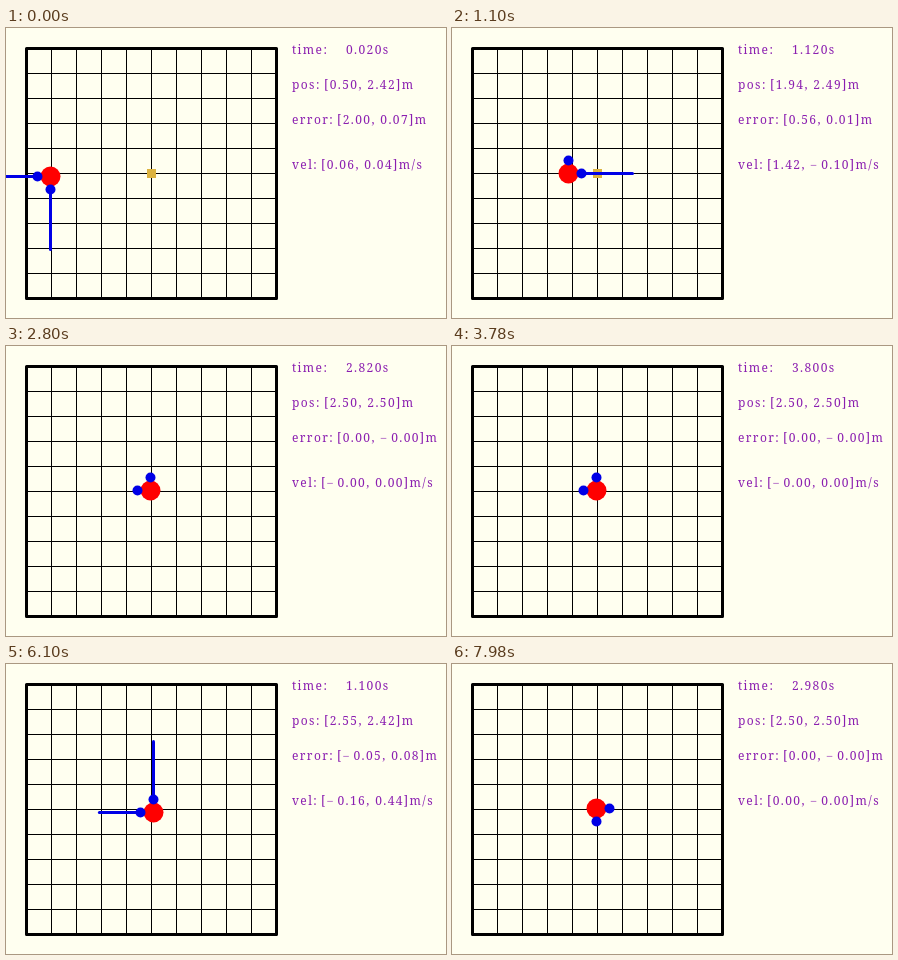
An HTML page with a canvas for the animation above (8 s loop, 440 px wide and 290 px high).

```html
<!DOCTYPE html>
<html lang="en">
<head>
<meta charset="utf-8">
<title>Thruster control</title>
<style>
  html, body { margin: 0; width: 100%; height: 100%; overflow: hidden; background: #fffff0; }
  canvas { display: block; }
</style>
</head>
<body>
<canvas id="stage" width="440" height="290"></canvas>
<script>
const ctx = document.getElementById('stage').getContext('2d');
const LOOP = 8000, SECOND_RUN = 5000, STEP = 20;
const TARGET = 2.4999, BLUE = '#0000e6';

// Each knot: time, position, velocity, acceleration.
const runs = [
  {
    goal: '#dcb340',
    x: [[0.02, 0.5, 0.06, 3], [0.56, 0.97, 1.68, 3], [0.8, 1.41, 1.92, 0.6],
        [1.12, 1.94, 1.42, -1.7], [1.94, 2.48, 0.1, -0.4], [2.6, 2.499, -0.0001, 0.0001]],
    y: [[0.02, 2.42495, 0.04, 2], [0.3, 2.49, 0.2, -1], [0.6, 2.53, 0, -0.3],
        [1.12, 2.49, -0.1, -0.05], [1.6, 2.435, 0, 0.4], [1.94, 2.46, 0.07, 0.03],
        [2.4, 2.49, 0.05, -0.1], [3.1, 2.501, 0.0001, -0.0001]]
  },
  {
    goal: '#eed640',
    x: [[0, 3.207, 0, -3], [0.3, 3.08, -0.73, -1.4], [1.1, 2.55, -0.16, 1.37],
        [1.35, 2.53, -0.03, 0.2], [2.2, 2.499, 0.0001, -0.0001]],
    y: [[0, 1.458, 0, 2.93], [0.3, 1.59, 0.88, 3], [0.5, 1.822, 1.43, 1.5],
        [1.1, 2.42, 0.44, -1.93], [1.4, 2.5, 0.08, -0.5], [2.4, 2.501, -0.0001, 0.0001]]
  }
];

// Quintic path through the knots, with its first two derivatives.
function motion(knots, t) {
  let i = knots.length - 1;
  while (i > 0 && t < knots[i][0] - 1e-6) i--;
  const [t0, p0, v0, a0] = knots[i];
  if (i === knots.length - 1) return { p: p0, v: v0, a: a0 };
  const [t1, p1, v1, a1] = knots[i + 1];
  const h = t1 - t0, s = (t - t0) / h;
  const v = v0 * h, a = a0 * h * h;
  const d = p1 - p0 - v - a / 2, e = v1 * h - v - a, f = a1 * h * h - a;
  const c3 = 10 * d - 4 * e + f / 2, c4 = -15 * d + 7 * e - f, c5 = 6 * d - 3 * e + f / 2;
  return {
    p: p0 + s * (v + s * (a / 2 + s * (c3 + s * (c4 + s * c5)))),
    v: (v + s * (a + s * (3 * c3 + s * (4 * c4 + s * 5 * c5)))) / h,
    a: (a + s * (6 * c3 + s * (12 * c4 + s * 20 * c5))) / (h * h)
  };
}

function line(x1, y1, x2, y2, width, color) {
  ctx.lineWidth = width;
  ctx.strokeStyle = color;
  ctx.beginPath();
  ctx.moveTo(x1, y1);
  ctx.lineTo(x2, y2);
  ctx.stroke();
}

function disc(x, y, r, color) {
  ctx.fillStyle = color;
  ctx.beginPath();
  ctx.arc(x, y, r, 0, Math.PI * 2);
  ctx.fill();
}

// The jet points along (dx, dy), away from the push.
function thruster(x, y, dx, dy, force) {
  const length = 30 * Math.min(3, Math.abs(force));
  const tx = x + 13 * dx, ty = y + 13 * dy;
  line(tx, ty, tx + length * dx, ty + length * dy, 3, BLUE);
  disc(tx, ty, 5, BLUE);
}

function drawGrid() {
  for (let i = 1; i < 10; i++) {
    const c = 20.5 + 25 * i;
    line(c, 20, c, 271, 1, '#000');
    line(20, c, 271, c, 1, '#000');
  }
  ctx.lineWidth = 3;
  ctx.lineJoin = 'round';
  ctx.strokeRect(20.5, 20.5, 250, 250);
}

const pair = (a, b) =>
  `[${a.toFixed(2)}, ${b.toFixed(2)}]`.replace(/-/g, '\u2212\u200a');

function drawReadout(t, x, y) {
  ctx.font = '12px "Noto Serif", serif';
  ctx.letterSpacing = '1.4px';
  ctx.fillStyle = '#8b1fb0';
  const row = (label, value, valueX, baseline) => {
    ctx.fillText(label, 286, baseline);
    ctx.fillText(value, valueX, baseline);
  };
  row('time:', t.toFixed(3) + 's', 340, 26);
  row('pos:', pair(x.p, y.p) + 'm', 318, 61);
  row('error:', pair(TARGET - x.p, TARGET - y.p) + 'm', 331, 96);
  row('vel:', pair(x.v, y.v) + 'm/s', 315, 141);
}

function draw(ms) {
  const first = ms < SECOND_RUN;
  const run = runs[first ? 0 : 1];
  const t = (first ? ms + STEP : ms - SECOND_RUN) / 1000;
  const x = motion(run.x, t), y = motion(run.y, t);
  const px = Math.floor(19.5 + 50 * x.p) + 0.5;
  const py = Math.floor(269.5 - 50 * y.p) + 0.5;

  ctx.fillStyle = '#fffff0';
  ctx.fillRect(0, 0, 440, 290);
  drawGrid();
  ctx.fillStyle = run.goal;
  ctx.fillRect(141, 141, 9, 9);
  disc(px, py, 10, '#f00');
  ctx.lineCap = 'round';
  thruster(px, py, x.a > 0 ? -1 : 1, 0, x.a);
  thruster(px, py, 0, y.a > 0 ? 1 : -1, y.a);
  ctx.lineCap = 'butt';
  drawReadout(t, x, y);
}

const start = performance.now();
function tick() {
  const elapsed = (performance.now() - start) % LOOP;
  draw(Math.floor(elapsed / STEP) * STEP);
  requestAnimationFrame(tick);
}
tick();
</script>
</body>
</html>
```
